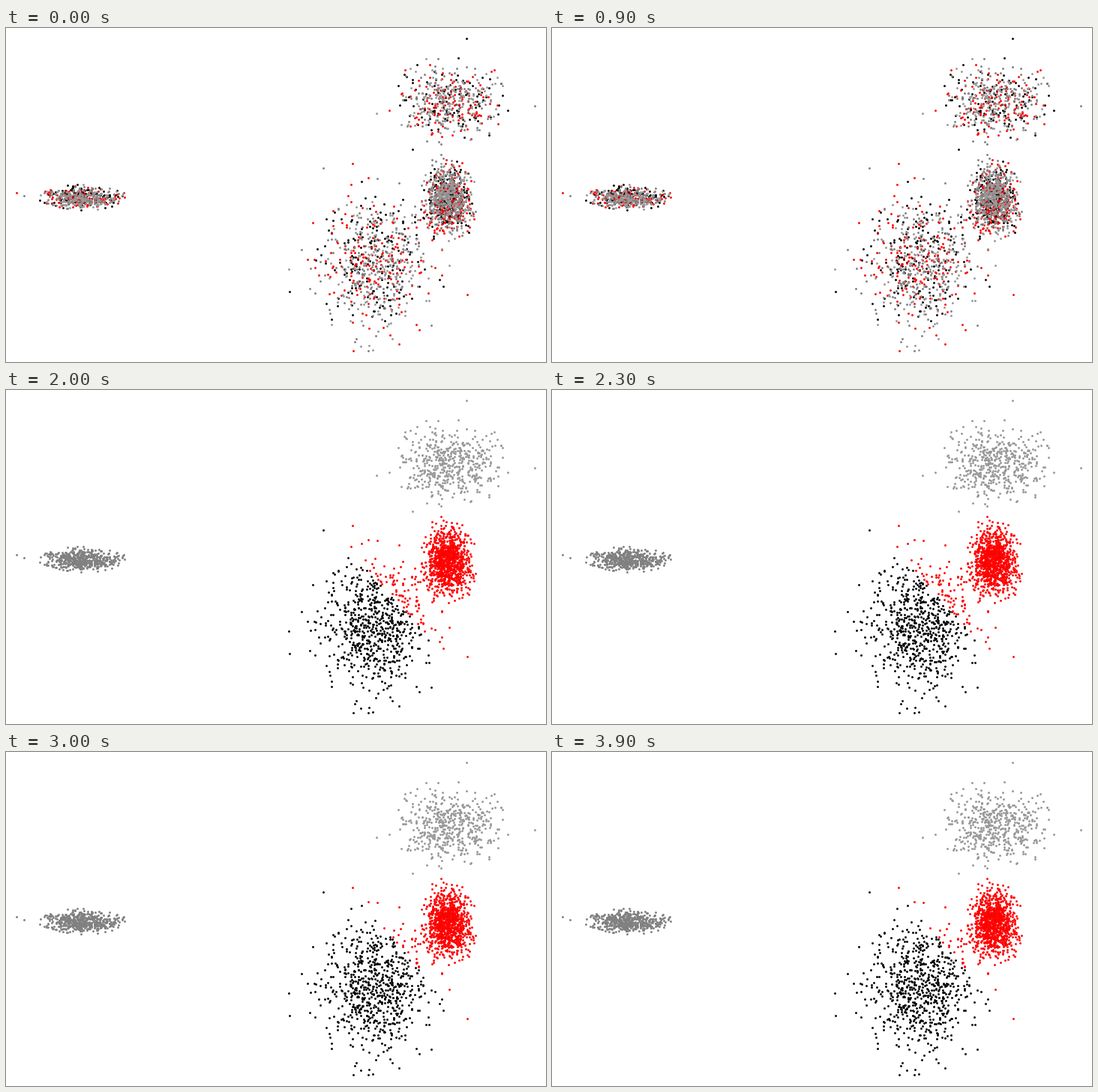
Recreate the animation shown at these times as a matplotlib script. Size 720 by 446 pixels, loop 4.5 s.

```python
import numpy as np
import matplotlib.pyplot as plt
from matplotlib.animation import FuncAnimation

W, H, DPI = 720, 446, 100
COLORS = ["#000000", "#ff0000", "#808080", "#999999"]
STEP_MS = 500
STAGES = [0, 0, 0, 1, 2, 3, 4, 4, 4]

# First centres, in the order of COLORS, all close to the overall mean
SEEDS = np.array([(459.64, 230.02), (478, 228), (457.07, 229.89),
                  (473.13, 223.54)])

# Outermost points; their first labels cycle through COLORS
FAR = [(614, 14), (14, 220), (705, 104), (494, 114),
       (378, 352), (463, 431), (423, 187), (377, 322),
       (542, 162), (615, 356), (24, 224), (489, 430),
       (474, 205), (462, 181)]

rng = np.random.default_rng(11)


def blob(cx, cy, sx, sy, n, reach):
    """Gaussian cloud cut off at `reach` standard deviations."""
    u = rng.uniform(np.exp(-reach**2 / 2), 1, n)
    r, a = np.sqrt(-2 * np.log(u)), rng.uniform(0, 2 * np.pi, n)
    return np.column_stack([cx + sx * r * np.cos(a), cy + sy * r * np.sin(a)])


def nearest(points, centres):
    gap = points[:, None] - centres
    return (gap**2).sum(axis=2).argmin(axis=1)


def kmeans(points, centres, rounds):
    """Labels after each round of assigning points and moving centres."""
    history = []
    for _ in range(rounds):
        label = nearest(points, centres)
        history.append(label)
        centres = np.array([points[label == k].mean(axis=0)
                            for k in range(len(centres))])
    return history


cloud = np.vstack([
    blob(102, 226, 23, 7, 530, 2.6),
    blob(589, 228, 14, 20.5, 1000, 3),
    blob(592, 97, 33, 23, 490, 2.7),
    blob(493, 313, 37, 43, 720, 2.8),
])
points = np.vstack([np.round(cloud), FAR])
start = np.concatenate([rng.integers(0, 4, len(cloud)),
                        np.arange(len(FAR)) % 4])
labels = [start] + kmeans(points, SEEDS, max(STAGES))

fig = plt.figure(figsize=(W / DPI, H / DPI), dpi=DPI, facecolor="white")
ax = fig.add_axes([0, 0, 1, 1])
ax.set_xlim(0, W)
ax.set_ylim(H, 0)
ax.axis("off")

dots = [ax.plot([], [], "o", color=c, ms=2.9 * 72 / DPI, mew=0)[0]
        for c in COLORS]


def draw(i):
    current = labels[STAGES[i]]
    for k, dot in enumerate(dots):
        dot.set_data(*points[current == k].T)
    return dots


anim = FuncAnimation(fig, draw, frames=len(STAGES), interval=STEP_MS,
                     init_func=lambda: draw(0), repeat=True, repeat_delay=0)
plt.show()
```
